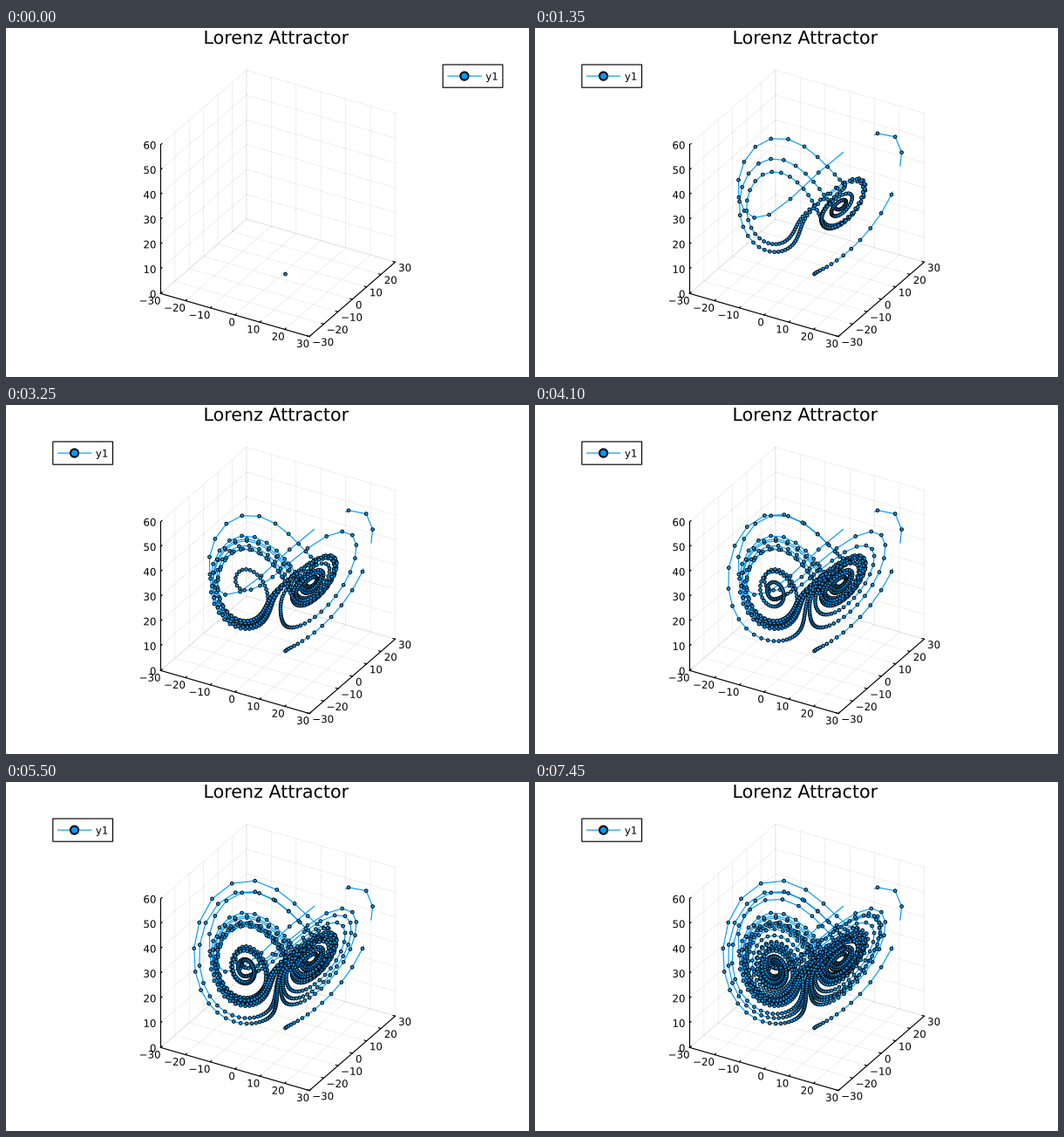
A matplotlib script that plays this animation: 600 px wide and 400 px high, repeating every 7500 ms.

```python
import numpy as np
import matplotlib.pyplot as plt
from matplotlib.animation import FuncAnimation
from matplotlib.patches import PathPatch, Rectangle
from matplotlib.path import Path
from matplotlib.textpath import TextPath

plt.rcParams["font.family"] = "DejaVu Sans"
plt.rcParams["path.simplify"] = False
plt.rcParams["path.snap"] = False

W, H, DPI = 600, 400, 100
PT = 72 / DPI                      # points per pixel
FRAMES, PER_FRAME = 150, 10
BLUE = "#009AF9"
STROKE = 1.15
LO = np.array([-30.0, -30.0, 0.0])
HI = np.array([30.0, 30.0, 60.0])
SCALE, CX, CY = 197 / 60, 312.0, 201.0


def project(p):
    """Orthographic view, azimuth and elevation 30 degrees, in pixels."""
    p = np.asarray(p, float)
    x, y, z = p[..., 0], p[..., 1], p[..., 2] - 30
    s, c = 0.5, np.sqrt(0.75)
    px = CX + SCALE * (c * x + s * y)
    py = CY + SCALE * (s * s * x - s * c * y - c * z)
    return np.stack([px, py], axis=-1)


def lorenz(steps, dt=0.02, sigma=10.0, rho=28.0, beta=8 / 3):
    x, y, z = 2.0, 1.0, 1.0
    out = []
    for _ in range(steps):
        dx = sigma * (y - x)
        dy = x * (rho - z) - y
        dz = x * y - beta * z
        x += dt * dx
        y += dt * dy
        z += dt * dz
        out.append((x, y, z))
    return np.array(out)


def clip(a, b):
    """Part of the segment a-b inside the box, or None."""
    t0, t1 = 0.0, 1.0
    for p, d, lo, hi in zip(a, b - a, LO, HI):
        if d == 0:
            if not lo <= p <= hi:
                return None
            continue
        u, v = sorted(((lo - p) / d, (hi - p) / d))
        t0, t1 = max(t0, u), min(t1, v)
    if t0 >= t1:
        return None
    start = a if t0 == 0 else a + t0 * (b - a)
    end = b if t1 == 1 else a + t1 * (b - a)
    return start, end


def trace(pts):
    """Clipped polyline, with its vertex count after each point."""
    verts, ends = [np.full(3, np.nan)], [1]
    for a, b in zip(pts[:-1], pts[1:]):
        part = clip(a, b)
        if part:
            if not np.array_equal(verts[-1], part[0]):
                verts += [np.full(3, np.nan), part[0]]
            verts.append(part[1])
        ends.append(len(verts))
    return project(np.array(verts)), ends


fig = plt.figure(figsize=(W / DPI, H / DPI), dpi=DPI, facecolor="white")
ax = fig.add_axes([0, 0, 1, 1])
ax.set_xlim(0, W)
ax.set_ylim(H, 0)
ax.axis("off")


def line3(a, b, width=STROKE, **kw):
    p = project([a, b])
    ax.plot(p[:, 0], p[:, 1], lw=width * PT, **{"color": "black", **kw})


def label(x, y, text, size=11.78, align=0.0, zorder=3):
    """Outlined text; align 0, 0.5, 1 puts its left, middle, right at x."""
    glyphs = TextPath((0, 0), text, size=size)
    box = glyphs.get_extents()
    shift = (x - box.x0 - align * box.width, y + 0.365 * size)
    path = Path(glyphs.vertices * (1, -1) + shift, glyphs.codes)
    return ax.add_patch(PathPatch(path, fc="black", lw=0, zorder=zorder))


def draw_box():
    grid = dict(width=0.6, alpha=0.1, zorder=1)
    for t in range(-30, 31, 10):
        h = t + 30
        line3((t, -30, 0), (t, 30, 0), **grid)
        line3((t, 30, 0), (t, 30, 60), **grid)
        line3((-30, t, 0), (30, t, 0), **grid)
        line3((-30, t, 0), (-30, t, 60), **grid)
        line3((-30, -30, h), (-30, 30, h), **grid)
        line3((-30, 30, h), (30, 30, h), **grid)

    line3((-30, -30, 0), (30, -30, 0), zorder=2)
    line3((30, -30, 0), (30, 30, 0), zorder=2)
    line3((-30, -30, 0), (-30, -30, 60), zorder=2)

    tick = 0.015 * 60
    for t in range(-30, 31, 10):
        h = t + 30
        name = str(t).replace("-", "\u2212")
        line3((t, -30, 0), (t, -30 + tick, 0), zorder=2)
        line3((30, t, 0), (30 - tick, t, 0), zorder=2)
        line3((-30, -30, h), (-30, -30 + tick, h), zorder=2)
        x, y = project((t, -30, 0))
        label(x - 0.7, y + 8, name, align=1)
        x, y = project((30, t, 0))
        label(x + 4.5, y + 6.3, name)
        x, y = project((-30, -30, h))
        label(x - 5.8, y + 0.6, str(h), align=1)


def make_legend(x):
    """Legend with its box starting at x."""
    y = 55.1
    box = Rectangle((x, 42), 68.7, 26.2, fc="white", ec="black",
                    lw=STROKE * PT, zorder=6)
    ax.add_patch(box)
    line, = ax.plot([x + 5.7, x + 43.9], [y, y], color=BLUE,
                    lw=STROKE * PT, zorder=7)
    dot = ax.scatter([x + 24.7] * 2, [y] * 2, s=[(9.2 * PT) ** 2, 0],
                     c=BLUE, edgecolors="black",
                     linewidths=[2 * PT, 0], zorder=8)
    text = label(x + 49.4, y + 0.2, "y1", zorder=8)
    return box, line, dot, text


draw_box()
label(310.8, 10.6, "Lorenz Attractor", 20.65, align=0.5)
right, left = make_legend(501.2), make_legend(53.8)

pts = lorenz(FRAMES * PER_FRAME)
path, ends = trace(pts)
inside = np.all((pts >= LO) & (pts <= HI), axis=1)
dots = project(pts)

curve, = ax.plot([], [], color=BLUE, lw=STROKE * PT, zorder=4)
# Two equal sizes keep the dots at sub-pixel positions.
marks = ax.scatter(dots[:2, 0], dots[:2, 1], s=[(3.7 * PT) ** 2] * 2,
                   c=BLUE, edgecolors="black", linewidths=0.9 * PT, zorder=5)


def draw(i):
    n = i * PER_FRAME + 1
    v = path[:ends[n - 1]]
    curve.set_data(v[:, 0], v[:, 1])
    marks.set_offsets(dots[:n][inside[:n]])
    for part in right:
        part.set_visible(i == 0)
    for part in left:
        part.set_visible(i > 0)
    return [curve, marks, *right, *left]


anim = FuncAnimation(fig, draw, frames=FRAMES, interval=50, repeat=True)
plt.show()
```
